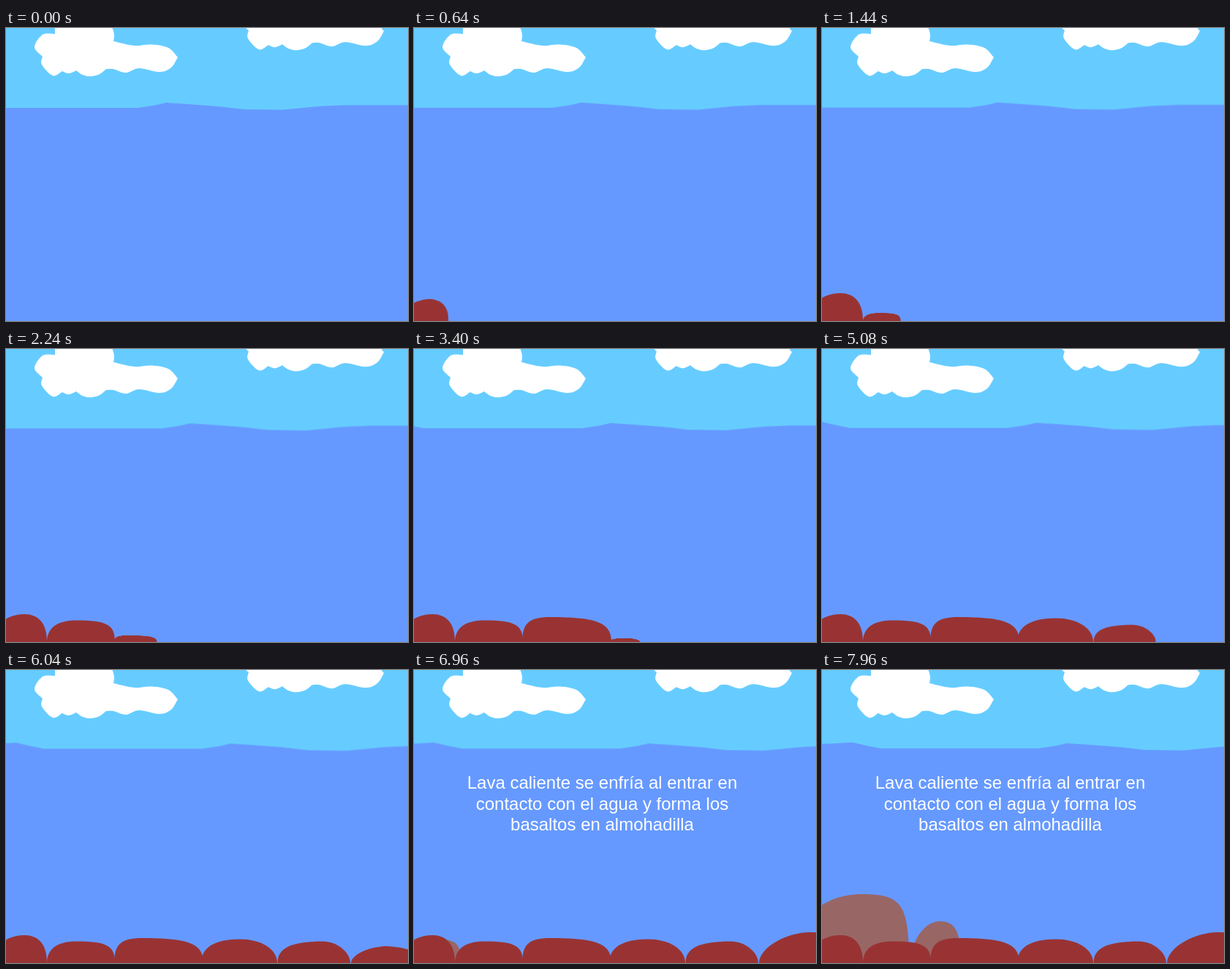
An HTML page that plays this animation: 550x400 px, repeating every 8000 ms.

```html
<!DOCTYPE html>
<html lang="es">
<head>
<meta charset="utf-8">
<title>Basaltos en almohadilla</title>
<style>
  html, body { margin: 0; width: 100%; height: 100%; overflow: hidden; background: #6cf; }
  svg { display: block; width: 550px; height: 400px; }
  #cloud { fill: #fff; }
  #sea { fill: #69f; }
  #rock { fill: #966; }
  #lava { fill: #933; }
  #caption { fill: #fff; font: 24px "Liberation Sans", Arial, sans-serif; text-anchor: middle; }
</style>
</head>
<body>
<svg viewBox="0 0 550 400">
  <path id="cloud"/>
  <use href="#cloud" x="282" y="-35.7"/>
  <polygon id="sea" points="-130,103 -104,102.6 -74,100.8 -56,105 -36,109 180,109 204,105.6 219,102
    250,104 290,107 325,111 378,111.7 430,106.8 465,105.3 570,105.3 570,420 -130,420"/>
  <g id="rock"></g>
  <g id="lava"></g>
  <g id="caption">
    <text x="257.5" y="162">Lava caliente se enfría al entrar en</text>
    <text x="257.5" y="190.5">contacto con el agua y forma los</text>
    <text x="257.5" y="219">basaltos en almohadilla</text>
  </g>
</svg>
<script>
const LOOP = 8000, STEP = 40, FLOOR = 400, CAPTION_AT = 6720;
const byId = id => document.getElementById(id);

function play(el, frames) {
  el.animate(frames, { duration: LOOP, iterations: Infinity, easing: `steps(${LOOP / STEP})` });
}

// Smooth curve through the points of one run; runs meet in sharp corners.
function smooth(run) {
  const points = run.trim().split(' ').map(p => p.split(',').map(Number));
  const at = i => points[Math.max(0, Math.min(points.length - 1, i))];
  const handle = (i, side) => at(i).map((v, k) => v + side * (at(i + 1)[k] - at(i - 1)[k]) / 6);
  return points.slice(1).map((p, i) => `C${handle(i, 1)} ${handle(i + 1, -1)} ${p}`).join('');
}

const cloudRuns = [
  '67,8 50,9 39,26 50,39', '50,39 49,50 64,65 77,59', '77,59 86,62 96,58',
  '96,58 105,64 116,66 128,63 137,56', '137,56 147,56 164,61 182,55 210,60 226,54 235,40',
  '235,40 222,27 199,22.5 175,24 147,18', '147,18 148,9 144,-5'
];
byId('cloud').setAttribute('d', 'M67 -5V8' + cloudRuns.map(smooth).join('') + 'Z');

// A dome from foot to foot; bulge sets how square each shoulder is.
function dome({ left, right, peak, height, bulge: [a, b] }) {
  const mix = (from, to, k) => from + (to - from) * k;
  return `M${left} 0C${left} ${-height * a} ${mix(peak, left, a)} ${-height} ${peak} ${-height}` +
    `C${mix(peak, right, b)} ${-height} ${right} ${-height * b} ${right} 0Z`;
}

const pillows = [
  { group: 'rock', left: -40, right: 119, peak: 55, height: 94, bulge: [.6, .85], grow: [6720, 7560] },
  { group: 'rock', left: 121, right: 190, peak: 161, height: 57, bulge: [.52, .75], grow: [7560, 7960] },
  { group: 'lava', left: -20, right: 56, peak: 25, height: 38, bulge: [.55, .65], grow: [0, 840] },
  { group: 'lava', left: 56, right: 149, peak: 96, height: 29.5, bulge: [.65, .8], grow: [1180, 2000] },
  { group: 'lava', left: 148, right: 270, peak: 186, height: 34, bulge: [.75, .77], grow: [2000, 3200] },
  { group: 'lava', left: 267, right: 371, peak: 320, height: 32.5, bulge: [.65, .58], grow: [3320, 4240] },
  { group: 'lava', left: 371.5, right: 471, peak: 434, height: 29.5, bulge: [.7, .5], grow: [4240, 5320] },
  { group: 'lava', left: 472, right: 620, peak: 542, height: 42, bulge: [.48, .55], grow: [5400, 6680] }
];

for (const pillow of pillows) {
  const path = document.createElementNS('http://www.w3.org/2000/svg', 'path');
  path.setAttribute('d', dome(pillow));
  byId(pillow.group).append(path);

  const anchor = Math.max(0, pillow.left);
  const pose = (time, sx, sy) => ({
    offset: time / LOOP,
    transform: `translate(${anchor}px, ${FLOOR}px) scale(${sx}, ${sy}) translate(${-anchor}px, 0px)`
  });
  const [begin, end] = pillow.grow;
  play(path, [pose(0, 0, 0), pose(begin, 0, 0), pose(begin, .35, .08), pose(end, 1, 1), pose(LOOP, 1, 1)]);
}

play(byId('sea'), [{ transform: 'translate(0px, 0px)' }, { transform: 'translate(116.5px, -2px)' }]);

const offset = CAPTION_AT / LOOP;
play(byId('caption'), [{ opacity: 0 }, { opacity: 0, offset }, { opacity: 1, offset }, { opacity: 1 }]);
</script>
</body>
</html>
```
